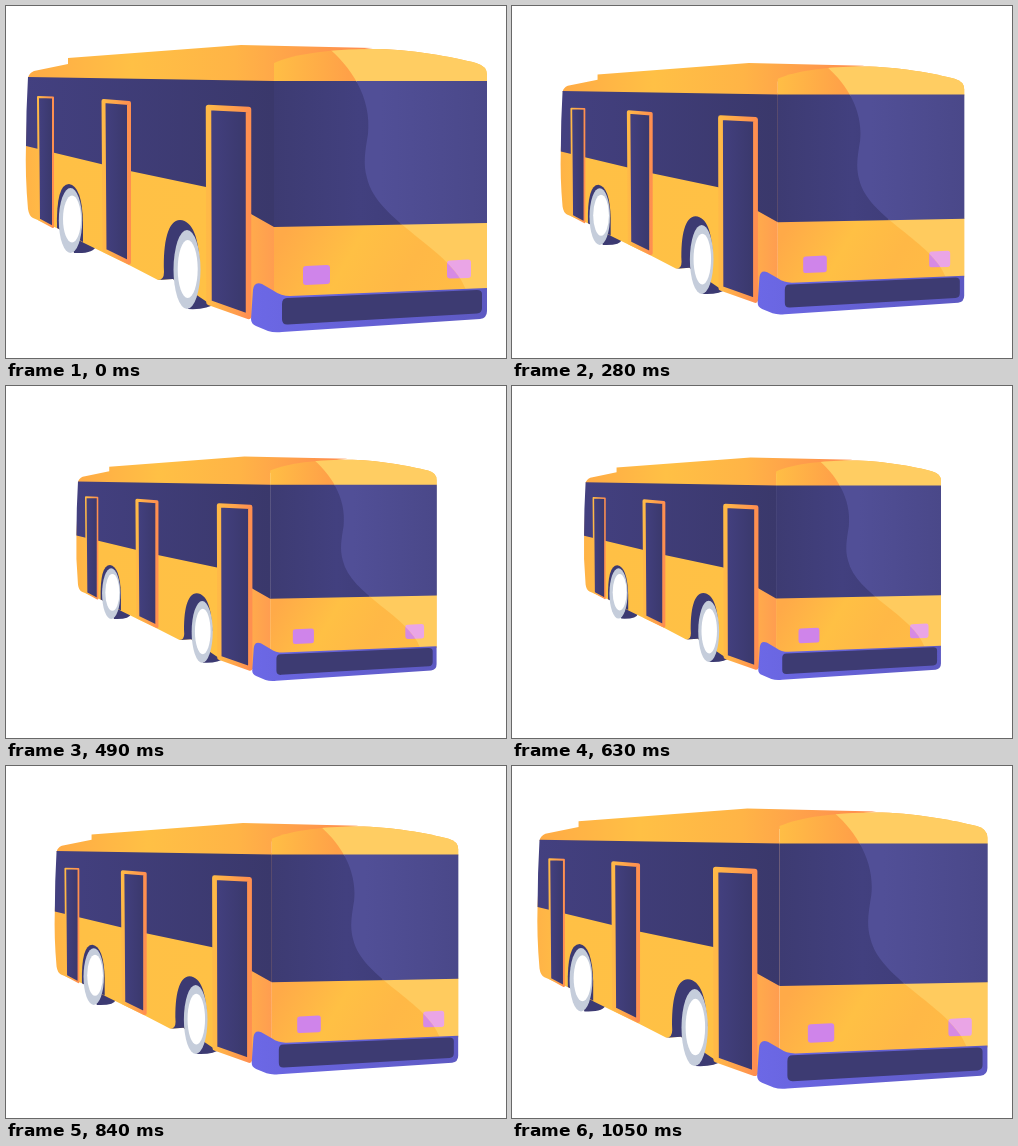
Animation, 500 px wide and 352 px high, one loop 1120 ms. Source, as an HTML page:

```html
<!DOCTYPE html>
<html lang="en">
<head>
<meta charset="utf-8">
<title>Bus</title>
<style>
  html, body { margin: 0; width: 100%; height: 100%; overflow: hidden; background: #fff; }
  svg { display: block; width: 500px; height: 352px; }
</style>
</head>
<body>
<svg viewBox="0 0 500 352">
  <defs>
    <linearGradient id="side">
      <stop offset="0" stop-color="#ffb347"/>
      <stop offset=".12" stop-color="#ffc045"/>
      <stop offset=".75" stop-color="#ffc145"/>
      <stop offset="1" stop-color="#ff9d50"/>
    </linearGradient>
    <linearGradient id="roof">
      <stop offset="0" stop-color="#ffab45"/>
      <stop offset=".3" stop-color="#ffc045"/>
      <stop offset=".6" stop-color="#ffb446"/>
      <stop offset=".95" stop-color="#ff8f4e"/>
    </linearGradient>
    <linearGradient id="front" x1="0" y1=".4" x2="1" y2=".6">
      <stop offset="0" stop-color="#ffaa48"/>
      <stop offset=".35" stop-color="#ffc044"/>
      <stop offset=".65" stop-color="#ffb846"/>
      <stop offset="1" stop-color="#ffbd45"/>
    </linearGradient>
    <linearGradient id="brow">
      <stop offset="0" stop-color="#ffbe45"/>
      <stop offset=".35" stop-color="#ffa148"/>
      <stop offset="1" stop-color="#ffc044"/>
    </linearGradient>
    <linearGradient id="glass">
      <stop offset="0" stop-color="#434080"/>
      <stop offset="1" stop-color="#3a386b"/>
    </linearGradient>
    <linearGradient id="screen">
      <stop offset="0" stop-color="#3d3b72"/>
      <stop offset=".4" stop-color="#42407f"/>
      <stop offset="1" stop-color="#3b3970"/>
    </linearGradient>
    <linearGradient id="shine">
      <stop offset="0" stop-color="#514f97"/>
      <stop offset=".5" stop-color="#514f97"/>
      <stop offset="1" stop-color="#4a4889"/>
    </linearGradient>
    <linearGradient id="frame">
      <stop offset="0" stop-color="#ffb947"/>
      <stop offset="1" stop-color="#ff8f50"/>
    </linearGradient>
    <linearGradient id="bumper">
      <stop offset="0" stop-color="#6c68e6"/>
      <stop offset="1" stop-color="#5d59c2"/>
    </linearGradient>
    <clipPath id="gloss">
      <path d="M320 40C345 60 366 92 362 128C359 146 357 158 361 172C371 216 446 243 460 284L490 284V40Z"/>
    </clipPath>
    <path id="browShape" d="M268 76V57C290 47 330 43 366 43C404 43 447 51 470 57Q481 60 481 69V76Z"/>
    <path id="screenShape" d="M268 75H481V217L268 221Z"/>
    <path id="panelShape" d="M268 220L481 216V284L268 292Z"/>
  </defs>

  <g id="bus">
    <!-- far wheels -->
    <path fill="#3c3a72" d="M62 225L90 240Q88 248 68 247ZM178 275L209 297Q202 304 182 303Z"/>

    <!-- side -->
    <path fill="url(#side)" d="M23 70L268 73V292L248 312L201 296L167 273L152 274L125 260L78 237L53 223L27 212Q23 210 22 203Q19 170 20 138Z"/>
    <path fill="url(#roof)" d="M22 72Q23 67 28 65L62 58V52L235 39L367 42L300 50L268 60V76Z"/>
    <path fill="url(#glass)" d="M22 71L268 75V221L245 208L200 181L124 165L20 140Q20 105 22 71Z"/>

    <!-- wheels -->
    <g fill="#3c3a72">
      <path d="M51 222Q50 178 63 178Q76 180 77 216V236Z"/>
      <path d="M152 274Q158 274 158 266C157 236 162 214 174 214C187 215 193 232 194 262L180 285L167 273Z"/>
    </g>
    <g fill="#c5cddb">
      <ellipse cx="64.5" cy="214.5" rx="11.7" ry="32.5"/>
      <ellipse cx="181" cy="263.5" rx="13.5" ry="39.5"/>
    </g>
    <g fill="#fff">
      <ellipse cx="66" cy="213" rx="9" ry="23.5"/>
      <ellipse cx="181.7" cy="263" rx="10" ry="29"/>
    </g>

    <!-- doors -->
    <g fill="url(#glass)" stroke="url(#frame)" stroke-linejoin="round">
      <path stroke-width="2" d="M32 91L47 91.5V221L33 213.5Z"/>
      <path stroke-width="4" d="M97.5 95L123 97V256.5L98.5 244.5Z"/>
      <path stroke-width="5.5" d="M202.5 101.5L242.5 103.5V310.5L203 296.5Z"/>
    </g>

    <!-- front -->
    <use href="#browShape" fill="url(#brow)"/>
    <use href="#panelShape" fill="url(#front)"/>
    <use href="#screenShape" fill="url(#screen)"/>
    <path fill="#cf84ea" d="M300 260L321 259Q324 259 324 262V275Q324 278 321 278L300 279Q297 279 297 276V263Q297 260 300 260Z"/>
    <path id="lamp" fill="#d68ae4" d="M444 254.500L462 253.500Q465 253.500 465 256.500V269Q465 272 462 272L444 272.500Q441 272.500 441 269.500V257.500Q441 254.500 444 254.500Z"/>
    <g clip-path="url(#gloss)">
      <use href="#browShape" fill="#ffcd62"/>
      <use href="#panelShape" fill="#ffcb5e"/>
      <use href="#screenShape" fill="url(#shine)"/>
      <path fill="#eaa5e6" d="M444 254.500L462 253.500Q465 253.500 465 256.500V269Q465 272 462 272L444 272.500Q441 272.500 441 269.500V257.500Q441 254.500 444 254.500Z"/>
    </g>

    <!-- bumper -->
    <path fill="url(#bumper)" d="M247 284Q248 275 256 278L268 285Q275 290 284 290L481 282V305Q481 312 474 313L276 326Q268 327 262 325L250 320Q245 318 245 313Z"/>
    <path fill="#3d3b72" d="M281 292L471 284Q476 284 476 288V302Q476 307 471 307.500L282 318.500Q276 319 276 313V298Q276 292 281 292Z"/>
  </g>
</svg>
<script>
  const STEP = 70, STEPS = 16, HALF = STEPS / 2;
  const bus = document.getElementById("bus");

  // Shrinks evenly to 75 %, then grows back with a slight ease.
  function scaleAt(step) {
    if (step <= HALF) return 1 - 0.25 * step / HALF;
    const u = step / HALF - 1;
    return 0.75 + 0.25 * (u - 0.04 * Math.sin(2 * Math.PI * u));
  }

  const start = performance.now();
  function draw() {
    const step = Math.floor((performance.now() - start) / STEP) % STEPS;
    bus.setAttribute("transform",
      `translate(250.5 183) scale(${scaleAt(step)}) translate(-250.5 -183)`);
    requestAnimationFrame(draw);
  }
  draw();
</script>
</body>
</html>
```
